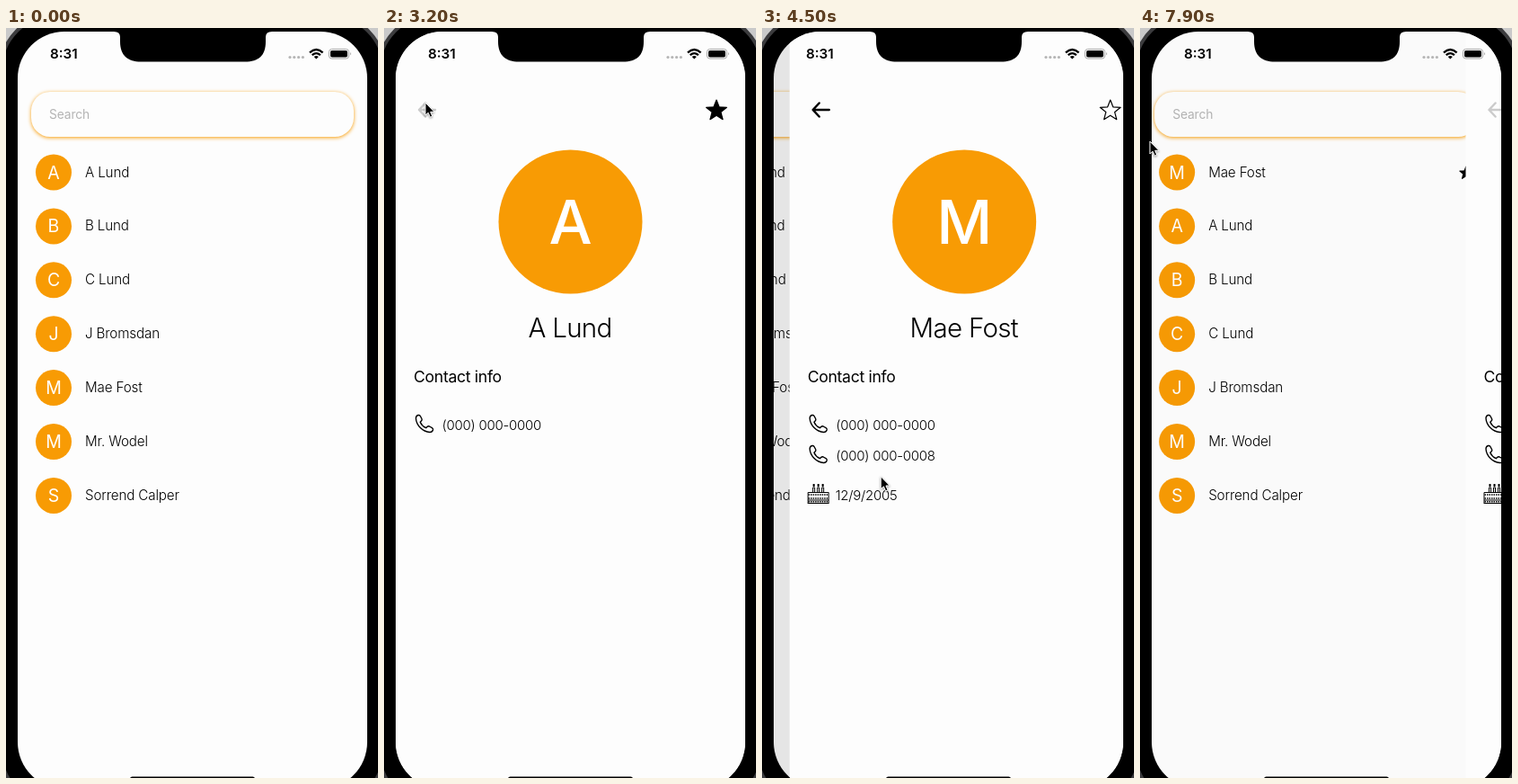
An HTML page that plays this animation: 414x834 px, repeating every 8 s.

```html
<!DOCTYPE html>
<html lang="en">
<head>
<meta charset="utf-8">
<title>Contacts</title>
<style>
  html, body { margin: 0; width: 100%; height: 100%; overflow: hidden; background: #c9c9c9; }
  svg { display: block; width: 414px; height: 834px; font-family: Inter, "Open Sans", sans-serif; }
  .row { font-size: 15.2px; font-weight: 300; letter-spacing: -.15px; }
  .initial { font-size: 19.5px; font-weight: 400; fill: #fff; text-anchor: middle; }
  .big { font-size: 68px; font-weight: 500; fill: #fff; text-anchor: middle; }
  .name { font-size: 29.5px; font-weight: 300; letter-spacing: -.7px; text-anchor: middle; }
  .heading { font-size: 17.6px; letter-spacing: -.3px; }
  .info { font-size: 15px; font-weight: 300; letter-spacing: -.25px; }
  .hint { font-size: 13.8px; letter-spacing: -.1px; fill: #b4b4b4; }
  .clock { font-size: 15.2px; font-weight: 600; }
  .line { fill: none; stroke: #000; }
  .search { filter: drop-shadow(0 1px 2px #f89b04); }
</style>
</head>
<body>
<svg viewBox="0 0 414 834">
  <defs>
    <clipPath id="screen"><rect x="13" y="4" width="389" height="842" rx="52"/></clipPath>
    <path id="phone" class="line" stroke-width="1.4" stroke-linejoin="round"
      d="M3 .5C1 1 .5 2.5 .5 4C1 12 8 19 16 19.5C18 19.5 19 18.5 19.5 17C19.8 16 19.5 15.2 18.5 14.6L15.5 13C14.5 12.5 13.8 12.8 13 13.5L11.8 14.7C9 13.5 6.5 11 5.3 8.2L6.5 7C7.2 6.3 7.5 5.5 7 4.5L5.4 1.5C4.8 .5 4 .3 3 .5Z"/>
    <g id="cake" class="line">
      <path d="M.5 10.5H23.5V19H.5ZM0 22.5H24M.5 19V22M23.5 19V22"/>
      <path stroke-width="1.4" stroke-dasharray="1.5 1" d="M1 13H23M1 17H23M1 20.7H23"/>
      <path d="M6 10V5H8V10M11 10V5H13V10M16 10V5H18V10"/>
      <path stroke-width="2" d="M7 1V4M12 1V4M17 1V4"/>
    </g>
  </defs>
  <rect x="-6" y="-15" width="427" height="880" rx="62" stroke="#3c3c3e" stroke-width="4"/>
  <g clip-path="url(#screen)">
    <rect width="414" height="834" fill="#fdfdfd"/>
    <g id="pages"></g>
    <rect x="138" y="832.5" width="139" height="5" rx="2.5"/>
  </g>
  <path d="M120 3V4Q127 4 127 10V15C127 31 136 37.5 150 37.5H266C281 37.5 289 31 289 15V10Q289 4 296 4V3Z"/>
  <text class="clock" x="49" y="34">8:31</text>
  <g fill="#b5b5b5">
    <circle cx="316" cy="32.5" r="1.6"/><circle cx="320.8" cy="32.5" r="1.6"/>
    <circle cx="325.6" cy="32.5" r="1.6"/><circle cx="330.4" cy="32.5" r="1.6"/>
  </g>
  <path class="line" stroke-width="2.3" d="M338 27.3Q345.3 20.7 352.6 27.3M340.7 30.2Q345.3 26 349.9 30.2"/>
  <path d="M342.7 32L345.3 34.6L347.9 32Q345.3 29.8 342.7 32Z"/>
  <rect x="359.5" y="23.5" width="22" height="10.5" rx="3" fill="none" stroke="#a5a5a5"/>
  <rect x="361" y="25" width="19" height="7.5" rx="1.8"/>
  <path fill="#a5a5a5" d="M383 27Q385 28.7 383 30.5Z"/>
  <path id="cursor" stroke="#fff" stroke-width="1" style="filter:drop-shadow(0 1px 1px #0006)"
    d="M0 0V14L3.2 11.2L5.4 16.2L7.8 15.2L5.7 10.3H10Z"/>
</svg>
<script>
const LOOP = 8000, STEP = 100, WIDTH = 389, ORANGE = '#f89b04';
const FIRST = 'A Lund', SECOND = 'Mae Fost';
const CONTACTS = [FIRST, 'B Lund', 'C Lund', 'J Bromsdan', SECOND, 'Mr. Wodel', 'Sorrend Calper'];

// Pointer path: time, x, y
const PATH = [
  [0, 430, 690], [100, 404, 641], [700, 60, 133], [1050, 60, 133], [1500, 356, 105],
  [1700, 364, 93], [1850, 364, 93], [2300, 120, 428], [2600, 80, 270], [2950, 46, 83],
  [3250, 46, 83], [4000, 130, 397], [4250, 130, 397], [4700, 134, 580], [4800, 133.5, 568],
  [4900, 134, 517], [5700, 345, 230], [6400, 366, 94], [6600, 366, 94], [6700, 327.5, 98],
  [7000, 230, 160], [7500, 50, 87], [7650, 50, 87], [7900, 11, 126], [8000, 4, 134]
];

const clamp = v => Math.max(0, Math.min(1, v));

function pointer(t) {
  const i = PATH.findIndex(p => p[0] > t);
  const [t0, x0, y0] = PATH[i - 1], [t1, x1, y1] = PATH[i];
  const k = (t - t0) / (t1 - t0);
  return [x0 + (x1 - x0) * k, y0 + (y1 - y0) * k];
}

// Critically damped slide that begins at the given time
function slide(t, start) {
  const u = Math.max(0, t - start) * .018;
  return u >= 9 ? 1 : 1 - (1 + u) * Math.exp(-u);
}

// Opacity of a control held from down to up
const pressed = (t, down, up) => 1 - .8 * (clamp((t - down) / 100) - clamp((t - up) / 250));

function star(x, y, r, filled) {
  const points = Array.from({ length: 10 }, (_, i) => {
    const a = i * Math.PI / 5, d = i % 2 ? r * .43 : r;
    return (x + d * Math.sin(a)).toFixed(2) + ',' + (y - d * Math.cos(a)).toFixed(2);
  });
  return `<polygon points="${points.join(' ')}" fill="${filled ? '#000' : 'none'}"
    stroke="#000" stroke-width="1.2" stroke-linejoin="round"/>`;
}

function listPage(t) {
  const favourite = t < 2000 ? '' : t < 7000 ? FIRST : SECOND;
  const order = [...CONTACTS].sort((a, b) => (b === favourite) - (a === favourite));
  const opacity = { [FIRST]: pressed(t, 850, 1050), [SECOND]: pressed(t, 4050, 4250) };
  const rows = order.map((name, i) => {
    const y = 160.5 + i * 59.9;
    return `<g opacity="${opacity[name] ?? 1}">
      <circle cx="53" cy="${y}" r="20" fill="${ORANGE}"/>
      <text class="initial" x="53" y="${y + 7}">${name[0]}</text>
      <text class="row" x="88" y="${y + 5}">${name}</text>
      ${name === favourite ? star(374.7, y + .9, 7.3, true) : ''}</g>`;
  });
  return `<rect class="search" x="28" y="71" width="359" height="50" rx="21" fill="#fdfdfd"/>
    <text class="hint" x="48" y="101">Search</text>${rows.join('')}`;
}

const phoneRow = (y, number) =>
  `<use href="#phone" x="35" y="${y}"/><text class="info" x="64.5" y="${y + 17}">${number}</text>`;

function detailPage(t) {
  const second = t > 4000, name = second ? SECOND : FIRST;
  const filled = second ? t > 6750 : t > 1880;
  const arrow = second ? pressed(t, 7500, LOOP) : pressed(t, 3100, 4000);
  const starOpacity = second ? pressed(t, 6600, 6720) : pressed(t, 1700, 1850);
  return `<rect x="13" width="${WIDTH}" height="834" fill="#fdfdfd"/>
    <path class="line" opacity="${arrow}" stroke-width="2.5" stroke-linecap="round" stroke-linejoin="round"
      d="M46 83.5L39 91L46 98.5M39.5 91H57"/>
    <g opacity="${starOpacity}">${star(370, 92, 12, filled)}</g>
    <circle cx="207.5" cy="215.5" r="80" fill="${ORANGE}"/>
    <text class="big" x="207.5" y="239.5">${name[0]}</text>
    <text class="name" x="207" y="344">${name}</text>
    <text class="heading" x="33" y="393.5">Contact info</text>
    ${phoneRow(430, '(000) 000-0000')}
    ${second ? phoneRow(464, '(000) 000-0008') +
      '<use href="#cake" x="33" y="506"/><text class="info" x="64" y="525">12/9/2005</text>' : ''}`;
}

const pages = document.getElementById('pages'), cursor = document.getElementById('cursor');
let shown = -1;

function render(t) {
  const p = slide(t, 1000) - slide(t, 3260) + slide(t, 4230) - slide(t, 7685);
  pages.innerHTML =
    `<g transform="translate(${-p * WIDTH * .3})">${listPage(t)}</g>
     <rect width="414" height="834" opacity="${p * .1}"/>
     ${p > .001 ? `<g transform="translate(${(1 - p) * WIDTH})">${detailPage(t)}</g>` : ''}`;
  cursor.setAttribute('transform', `translate(${pointer(t)})`);
}

function tick() {
  const t = Math.floor(performance.now() % LOOP / STEP) * STEP;
  if (t !== shown) render(shown = t);
  requestAnimationFrame(tick);
}
tick();
</script>
</body>
</html>
```
